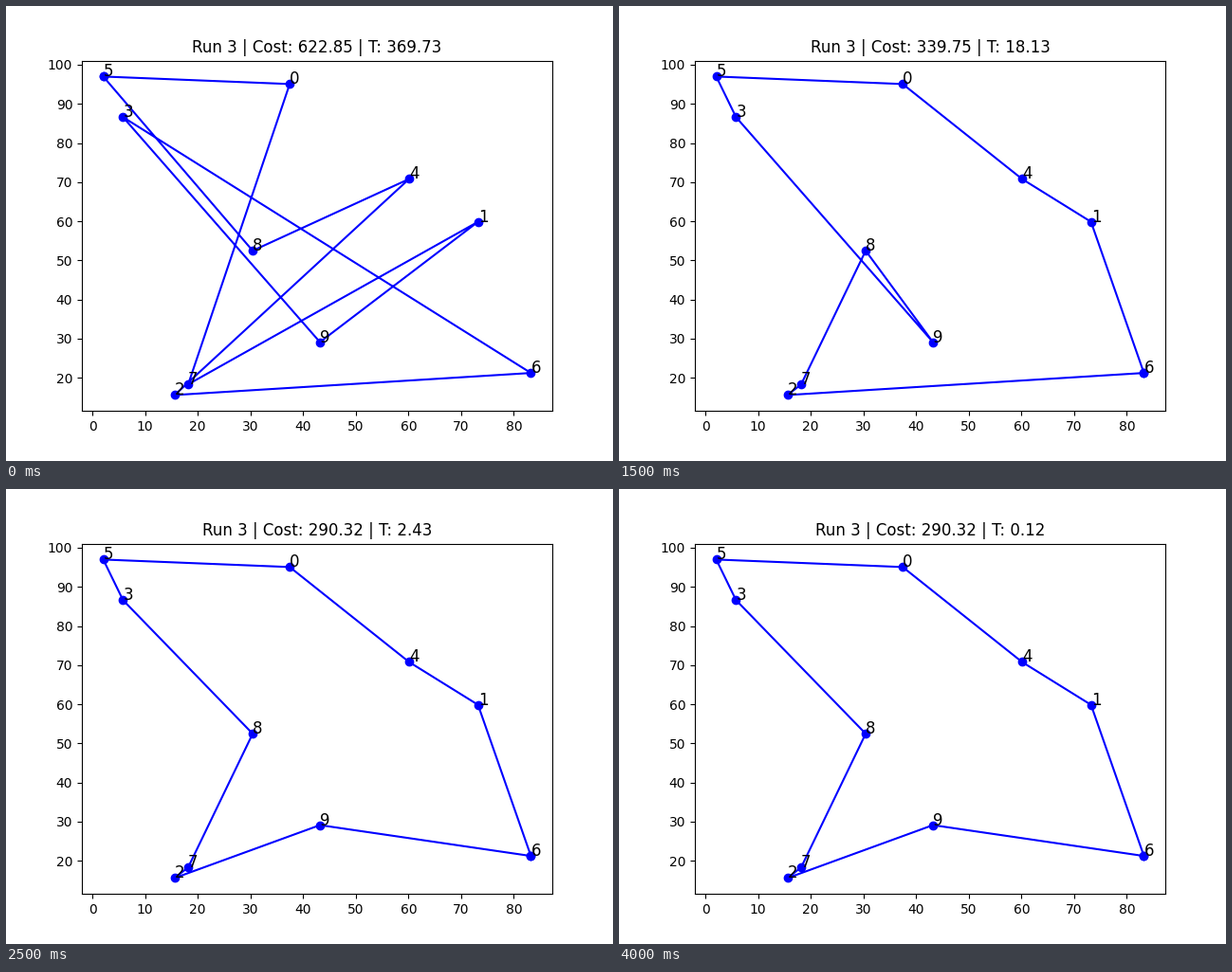
Write a matplotlib script that moves like this. It is 640 by 480 pixels and loops after 4.5 s.

```python
import matplotlib.pyplot as plt
import numpy as np
from matplotlib.animation import FuncAnimation

T_START, COOLING, EVERY = 1000, 0.99, 100

np.random.seed(42)
cities = np.random.rand(10, 2) * 100

# Visiting order at each snapshot of the annealing run
routes = ["5071936248", "3762541809", "5043817926", "6278935041", "9627835041"]
settled = "6927835041"
routes += [settled, settled.replace("27", "72"), settled, settled]


def closed_tour(route):
    return cities[[int(c) for c in route + route[0]]]


def tour_cost(tour):
    return np.hypot(*np.diff(tour, axis=0).T).sum()


def temperature(step):
    return T_START * COOLING ** (EVERY * (step + 1) - 1)


fig, ax = plt.subplots(figsize=(6.4, 4.8), dpi=100)
line, = ax.plot(*closed_tour(routes[0]).T, "bo-")
title = ax.set_title("")
for i, (x, y) in enumerate(cities):
    ax.text(x, y, str(i), fontsize=12)


def update(step):
    tour = closed_tour(routes[step])
    line.set_data(*tour.T)
    title.set_text(f"Run 3 | Cost: {tour_cost(tour):.2f}"
                   f" | T: {temperature(step):.2f}")
    return line, title


anim = FuncAnimation(fig, update, frames=len(routes), interval=500,
                     init_func=lambda: update(0), repeat=True, repeat_delay=0)
plt.show()
```
